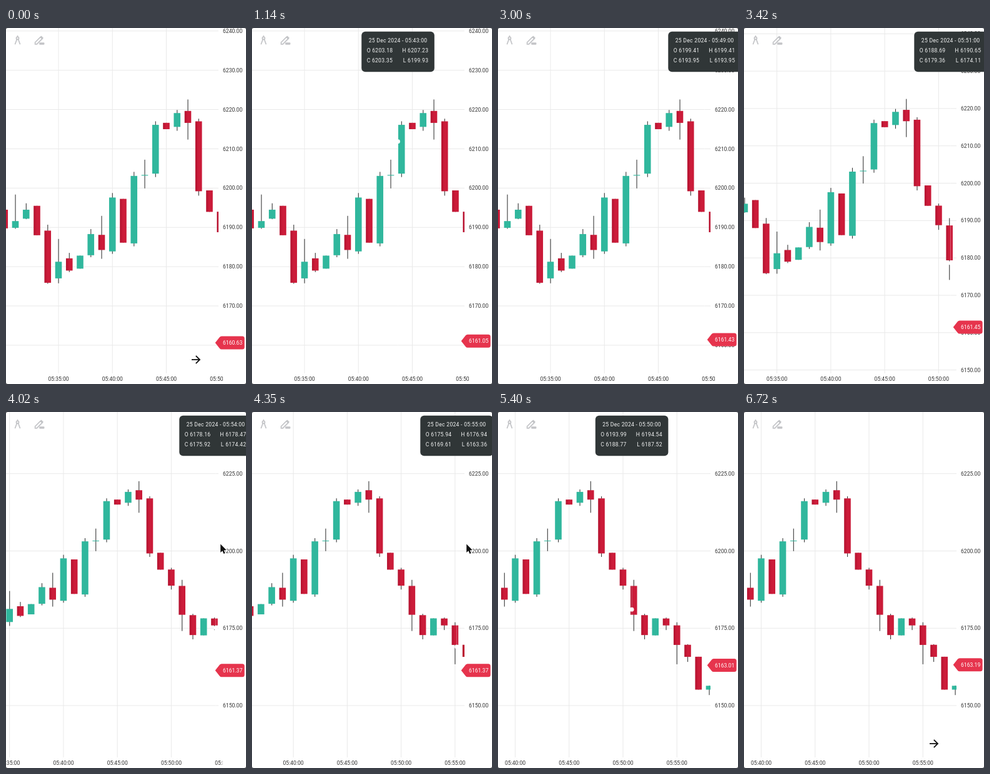
These frames come from a looping animation (384x570 px, 6990 ms). An HTML page with a canvas:

```html
<!DOCTYPE html>
<html lang="en">
<head>
<meta charset="utf-8">
<title>Candlestick chart</title>
<style>
  html, body { margin: 0; width: 100%; height: 100%; overflow: hidden; background: #fff; }
  canvas { display: block; width: 384px; height: 570px; }
</style>
</head>
<body>
<canvas id="chart"></canvas>
<script>
const W = 384, H = 570, LOOP = 6990;
const PLOT_W = 340, PLOT_H = 553, STEP = 17.25, FIRST_X = -2.25, FIRST_MINUTE = 30;
const TOP = { y: 97.2, price: 6225.3 }, LOW_Y = 453.2;
const RED = '#c91a38', TEAL = '#30b79d', GRID = '#e9e9e9', LABEL = '#333';

// Closing prices above 6100, one per minute
const closes = [89.75, 91.6, 94.5, 88, 75.9, 81.25, 79, 82.81, 88.3, 84.25,
  97.6, 86.1, 103.1, 103.35, 116.1, 115, 119.1, 116.6, 99.2, 93.95,
  88.77, 79.36, 72.8, 78.2, 75.92, 69.61, 65.75, 55.15, 56.4];

// Each candle opens a small wave away from the last close; wicks swell every
// fourth minute, their weight moving from the upper to the lower side.
const candles = closes.map((last, i) => {
  const gap = (0.4 + Math.cos(Math.PI * (i - 4.5) / 6)) * (1 - i / 28);
  const swell = Math.cos(Math.PI * (i - 1) / 4) ** 4;
  const close = 6100 + last;
  const open = 6100 + (i ? closes[i - 1] + gap : 94.5);
  return {
    open, close,
    high: Math.max(open, close) + swell * (7 - 0.24 * i),
    low: Math.min(open, close) - swell * 0.25 * i
  };
});

const ramp = (t, from, to) => Math.max(0, Math.min(1, (t - from) / (to - from)));
const smooth = u => u * u * (3 - 2 * u);
const glide = (t, from, to) => smooth(ramp(t, from, to));

const scrollAt = t => Math.max(0, Math.min(142.75, (t - 3021) * 0.0783));
const lowAt = t => 6168.7 - 15.3 * glide(t, 3200, 3990);
const hoverAlphaAt = t => ramp(t, 980, 1080) - ramp(t, 5700, 5850);

const hoverAt = t => 240
  - 18 * ramp(t, 990, 1410)
  - 103.4 * ramp(t, 1830, 2130)
  + 212 * ramp(t, 2430, 3000)
  + 5 * ramp(t, 3420, 4020)
  - 8 * ramp(t, 4020, 4350)
  - 113.4 * ramp(t, 4700, 5280)
  - 32 * ramp(t, 5400, 5700);

const priceAt = t => 6160.63
  + 0.42 * glide(t, 30, 390)
  + 0.38 * glide(t, 1830, 2130)
  + 0.02 * glide(t, 3000, 3300)
  - 0.08 * glide(t, 3600, 3900)
  + 1.64 * glide(t, 4590, 5280)
  - 0.5 * glide(t, 5400, 5700)
  + 0.68 * glide(t, 6450, 6720);

const canvas = document.getElementById('chart');
const ctx = canvas.getContext('2d');
const dpr = window.devicePixelRatio || 1;
canvas.width = W * dpr;
canvas.height = H * dpr;

const clock = minute => `05:${String(minute).padStart(2, '0')}:00`;

function text(str, x, y, color, align = 'left', spacing = 0) {
  ctx.font = '8.6px Roboto, sans-serif';
  ctx.letterSpacing = spacing + 'px';
  ctx.textAlign = align;
  ctx.textBaseline = 'alphabetic';
  ctx.fillStyle = color;
  ctx.fillText(str, x, y + 3.1);
}

function rect(x, y, w, h, color) {
  ctx.fillStyle = color;
  ctx.fillRect(x, y, w, h);
}

function path(points, close) {
  ctx.beginPath();
  points.forEach(([x, y]) => ctx.lineTo(x, y));
  if (close) ctx.closePath();
}

function line(...points) {
  path(points);
  ctx.stroke();
}

function clipped(w, draw) {
  ctx.save();
  ctx.beginPath();
  ctx.rect(0, 0, w, H);
  ctx.clip();
  draw();
  ctx.restore();
}

function makeView(t) {
  const scroll = scrollAt(t);
  const scale = (LOW_Y - TOP.y) / (TOP.price - lowAt(t));
  return {
    scale,
    x: i => FIRST_X + i * STEP - scroll,
    y: price => TOP.y + (TOP.price - price) * scale,
    index: x => (x + scroll - FIRST_X) / STEP
  };
}

function drawGrid(view) {
  const step = view.scale > 5.5 ? 10 : 25;
  for (let price = 6100; price <= 6250; price += step) {
    const y = view.y(price);
    if (y < 0 || y > PLOT_H) continue;
    rect(0, y - 0.5, PLOT_W, 1, GRID);
    text(price.toFixed(2), 347, y, LABEL);
  }
  for (let i = 5; i <= 30; i += 5) {
    const x = view.x(i);
    if (x < PLOT_W) rect(x - 0.5, 0, 1, PLOT_H, GRID);
    clipped(347, () => text(clock(FIRST_MINUTE + i), x, 562, LABEL, 'center'));
  }
}

function drawCandles(view) {
  const w = 10.6;
  candles.forEach(({ open, high, low, close }, i) => {
    const x = view.x(i), top = view.y(Math.max(open, close));
    rect(x - 0.5, view.y(high), 1.1, (high - low) * view.scale, '#3a3a3a');
    let fill = TEAL;
    if (close < open) {
      fill = ctx.createLinearGradient(x - w / 2, 0, x + w / 2, 0);
      fill.addColorStop(0, '#b3122f');
      fill.addColorStop(0.5, '#cd1c3a');
      fill.addColorStop(1, RED);
    }
    rect(x - w / 2, top, w, Math.max(1, Math.abs(open - close) * view.scale), fill);
  });
}

// White dot on the line through the closes; returns the hovered candle's index
function drawMarker(view, x) {
  const pos = view.index(x);
  const i = Math.min(candles.length - 1, Math.floor(pos + 0.02));
  const next = candles[Math.min(i + 1, candles.length - 1)];
  const close = candles[i].close + (next.close - candles[i].close) * Math.max(0, pos - i);
  rect(x - 0.5, 72, 1, PLOT_H - 72, 'rgba(255,255,255,.3)');
  ctx.beginPath();
  ctx.arc(x, view.y(close), 3.4, 0, 7);
  ctx.fillStyle = '#fff';
  ctx.fill();
  return i;
}

function drawTooltip(x, i) {
  const left = x - 58.3, spacing = 0.27, white = '#f4f5f5';
  const cell = (name, column, y) => {
    const label = `${name} ${candles[i][column].toFixed(2)}`;
    const onLeft = name === 'O' || name === 'C';
    text(label, left + (onLeft ? 8.4 : 107), y, white, onLeft ? 'left' : 'right', spacing);
  };
  ctx.beginPath();
  ctx.roundRect(left, 5.7, 116.6, 64.6, 6);
  ctx.fillStyle = '#303637';
  ctx.fill();
  text(`25 Dec 2024 - ${clock(FIRST_MINUTE + i)}`, x, 20, white, 'center', spacing);
  cell('O', 'open', 36.2);
  cell('H', 'high', 36.2);
  cell('C', 'close', 52);
  cell('L', 'low', 52);
}

function drawPriceTag(view, price) {
  const y = view.y(price), half = 10.5;
  ctx.beginPath();
  ctx.moveTo(334.7, y);
  ctx.arcTo(343, y - half, 350, y - half, 4);
  ctx.arcTo(381.6, y - half, 381.6, y, 3.5);
  ctx.arcTo(381.6, y + half, 350, y + half, 3.5);
  ctx.arcTo(343, y + half, 334.7, y, 4);
  ctx.closePath();
  ctx.fillStyle = '#e6344d';
  ctx.fill();
  text(price.toFixed(2), 347, y, '#fff');
}

function drawTools() {
  ctx.strokeStyle = ctx.fillStyle = '#c3c4c7';
  ctx.lineWidth = 1.7;
  // compass
  line([17.6, 17.5], [14.4, 26.3]);
  line([19.4, 17.5], [22.6, 26.3]);
  line([18.5, 12], [18.5, 15]);
  ctx.beginPath();
  ctx.arc(18.5, 16.4, 2, 0, 7);
  ctx.stroke();
  // pencil
  path([[46.6, 25.9], [46.6, 23], [55.2, 14.4], [58, 17.2], [49.4, 25.9]], true);
  ctx.stroke();
  path([[54.4, 14.7], [56.6, 12.6], [60, 15.9], [57.8, 18.1]], true);
  ctx.fill();
  ctx.beginPath();
  ctx.roundRect(53.2, 23.2, 8.2, 3.5, 1);
  ctx.fill();
}

function drawArrow() {
  ctx.strokeStyle = '#111';
  ctx.lineWidth = 1.8;
  line([297, 531], [309.5, 531]);
  line([303.8, 524.8], [310, 531], [303.8, 537.2]);
}

function drawPointer() {
  ctx.save();
  ctx.translate(343.2, 211.4);
  path([[0, 0], [0, 13.6], [3.1, 10.8], [5.2, 15.6], [7.4, 14.6], [5.4, 10], [9.4, 9.6]], true);
  ctx.lineJoin = 'round';
  ctx.lineWidth = 2;
  ctx.strokeStyle = '#fff';
  ctx.stroke();
  ctx.fillStyle = '#111';
  ctx.fill();
  ctx.restore();
}

function drawCorners() {
  ctx.beginPath();
  ctx.rect(0, 0, W, H);
  ctx.roundRect(0, 0, W, H, 3);
  ctx.fillStyle = '#555';
  ctx.fill('evenodd');
}

function draw(t) {
  const view = makeView(t);
  const hoverX = hoverAt(t), alpha = hoverAlphaAt(t);
  let hovered = 0;
  ctx.setTransform(dpr, 0, 0, dpr, 0, 0);
  rect(0, 0, W, H, '#fff');
  drawGrid(view);
  clipped(PLOT_W, () => {
    drawCandles(view);
    ctx.globalAlpha = alpha;
    if (alpha) hovered = drawMarker(view, hoverX);
  });
  drawPriceTag(view, priceAt(t));
  drawTools();
  ctx.globalAlpha = 1 - alpha;
  drawArrow();
  ctx.globalAlpha = alpha;
  if (alpha) drawTooltip(hoverX, hovered);
  ctx.globalAlpha = 1;
  if (t >= 3700 && t < 4800) drawPointer();
  drawCorners();
}

const start = performance.now();
function tick() {
  draw((performance.now() - start) % LOOP);
  requestAnimationFrame(tick);
}
tick();
</script>
</body>
</html>
```
